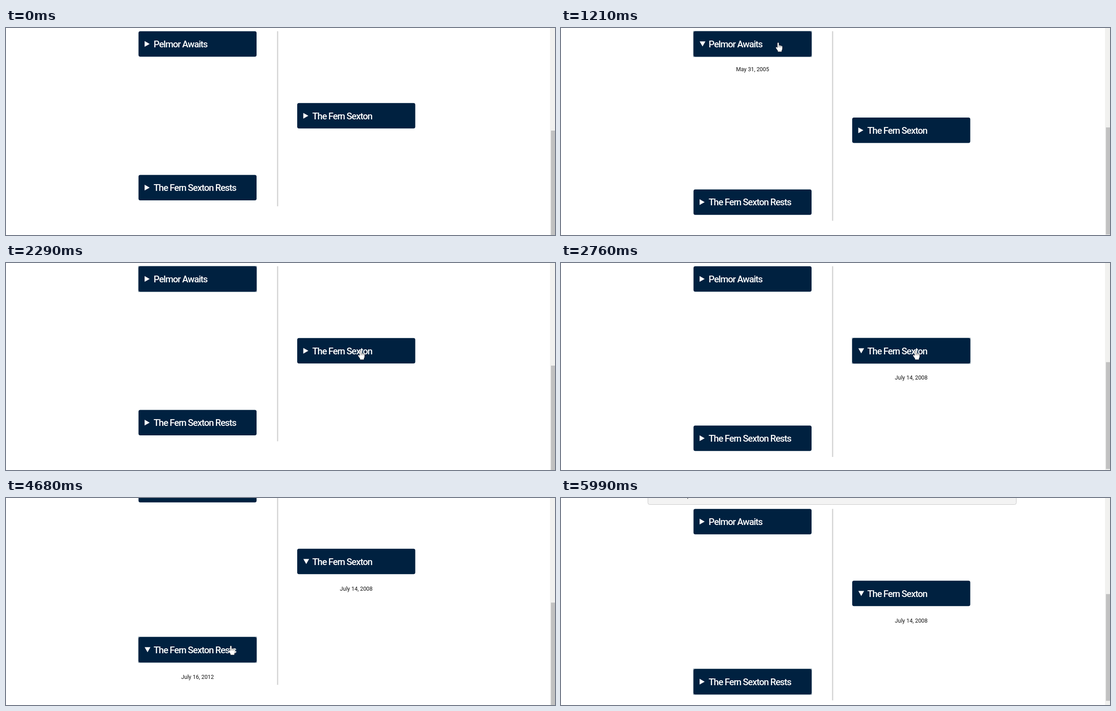
Recreate the animation shown at these times as an HTML page with a canvas. Size 1216 px wide and 460 px high, loop 6700 ms.

```html
<!DOCTYPE html>
<html lang="en">
<head>
<meta charset="utf-8">
<title>Timeline</title>
<style>
html, body { margin: 0; width: 100%; height: 100%; overflow: hidden; background: #fff; }
canvas { display: block; }
</style>
</head>
<body>
<canvas id="stage" width="1216" height="460"></canvas>
<script>
const ctx = document.getElementById('stage').getContext('2d');

// Time advances in discrete steps, like a screen recording.
const LOOP = 6700, START = 210, STEP = 77.1;
const HOLD = 2;
const BOX_W = 261.5, BOX_H = 56.5, TOP = 7.2, PITCH = 159.6;
const FULL_GAP = 36.5, SLIDE = 10.5;
const FONT = 'Roboto, "Open Sans", sans-serif';

const clicks = [
  { at: 9, item: 0 }, { at: 20, item: 0 }, { at: 28, item: 1 },
  { at: 42, item: 2 }, { at: 62, item: 2 }
];

const items = [
  ['Pelmor Awaits', 'May 31, 2005'],
  ['The Fern Sexton', 'July 14, 2008'],
  ['The Fern Sexton Rests', 'July 16, 2012']
].map(([title, date], i) => {
  const [open, shut = Infinity] = clicks.filter(c => c.item === i).map(c => c.at + HOLD);
  return { title, date, open, shut, x: i % 2 ? 645 : 293.5, y: TOP + PITCH * i };
});

const moves = [
  { from: 0, to: 8, x: 481, y: 32 },
  { from: 22, to: 27, x: 785, y: 194 },
  { from: 35, to: 42, x: 528, y: 374 },
  { from: 47, to: 52, x: 521, y: 250 },
  { from: 53, to: 58, x: 498, y: 328 },
  { from: 64, to: 67, x: 594, y: 318 },
  { from: 67, to: 70, x: 667, y: 301 },
  { from: 72, to: 74, x: 895, y: 369 }
];
const LAST_STEP = 74;

const clamp = v => Math.min(Math.max(v, 0), 1);
const sum = list => list.reduce((a, b) => a + b, 0);

function ease(n, from, to) {
  const p = clamp((n - from) / (to - from));
  return p * p * (3 - 2 * p);
}

function pointerAt(n) {
  let x = 1032, y = 446;
  for (const m of moves) {
    const p = ease(n, m.from, m.to);
    x += (m.x - x) * p;
    y += (m.y - y) * p;
  }
  return { x, y };
}

const isOpen = (it, n) => n >= it.open && n < it.shut;
const reveal = (it, n) => 1 - Math.pow(1 - clamp((n - it.open) / 4), 1.3);

function gapOf(it, n) {
  if (n < it.open) return 0;
  if (isOpen(it, n)) return FULL_GAP - SLIDE * (1 - reveal(it, n));
  return FULL_GAP * Math.pow(1 - clamp((n - it.shut + 1) / 5), 1.5);
}

function roundBox(x, y, w, h, r, color) {
  ctx.fillStyle = color;
  ctx.beginPath();
  ctx.roundRect(x, y, w, h, r);
  ctx.fill();
}

function label(text, x, y, font, color, align = 'left', spacing = 0) {
  ctx.font = font;
  ctx.fillStyle = color;
  ctx.textAlign = align;
  ctx.letterSpacing = spacing + 'px';
  ctx.fillText(text, x, y);
}

function triangle(x, y, turned) {
  ctx.save();
  ctx.translate(x, y);
  if (turned) ctx.rotate(Math.PI / 2);
  ctx.fillStyle = '#fff';
  ctx.beginPath();
  ctx.moveTo(-5.6, -6.4);
  ctx.lineTo(5.6, 0);
  ctx.lineTo(-5.6, 6.4);
  ctx.fill();
  ctx.restore();
}

function drawItem(it, y, n, focused) {
  const { x } = it, mid = y + BOX_H / 2, open = isOpen(it, n);
  if (focused) roundBox(x - 0.8, y - 0.8, BOX_W + 1.6, BOX_H + 1.6, 1, '#93a3ae');
  roundBox(x, y, BOX_W, BOX_H, 4, '#002140');
  triangle(x + (open ? 20 : 19.1), mid, open);
  label(it.title, x + 33.5, mid + 7.5, '500 20.5px ' + FONT, '#fff', 'left', -1.1);
  if (!open) return;
  const p = reveal(it, n);
  ctx.globalAlpha = clamp(p * 1.7);
  label(it.date, x + BOX_W / 2, y + BOX_H + 26.5 + SLIDE * p, '12.3px ' + FONT, '#111', 'center');
  ctx.globalAlpha = 1;
}

function drawPanel(scroll) {
  const bottom = -2.5 - scroll;
  if (bottom < 0) return;
  roundBox(192.5, bottom - 80, 816, 80, 4, '#f3f3f3');
  ctx.strokeStyle = '#c8c8c8';
  ctx.lineWidth = 1;
  ctx.stroke();
  label(',', 277, bottom - 14.5, '13px "Noto Sans Mono", monospace', '#333');
}

function drawScrollbar(scroll, gap) {
  ctx.fillStyle = '#f1f1ef';
  ctx.fillRect(1205, 0, 11, 460);
  ctx.fillStyle = '#c1c1c1';
  ctx.fillRect(1207, 228 - gap * 0.22 + scroll * 0.38, 9, 243 - gap * 0.16);
}

const arrow = new Path2D('M.5 .5V14.5L3.8 11.4L6 16.4L8.2 15.4L6 10.6H10.3Z');
const hand = new Path2D('M-1.4 1.4Q0 -.6 1.4 1.4V7Q2.8 5.9 4 7.2Q5.5 6.4 6.5 7.9Q8.8 7.3 9.1 9.8V14Q9 16.5 7.6 18V20.5H-.6V18.6L-4.4 13.2Q-5.7 10.7 -3.8 10.5Q-2.6 10.6 -1.4 12.3Z');
const creases = new Path2D('M1.4 7V11M4 7.4V11M6.5 8V11');

function drawPointer(n, ys) {
  if (n < 0 || n > LAST_STEP) return;
  const { x, y } = pointerAt(n);
  if (clicks.some(c => n >= c.at && n < c.at + HOLD)) {
    ctx.fillStyle = 'rgba(255, 235, 0, 0.5)';
    ctx.beginPath();
    ctx.arc(x + 0.7, y, 10.7, 0, Math.PI * 2);
    ctx.fill();
  }
  const over = items.some((it, i) =>
    x >= it.x && x <= it.x + BOX_W && y >= ys[i] && y <= ys[i] + BOX_H);
  const shape = over ? hand : arrow;
  ctx.save();
  ctx.translate(x, y);
  ctx.fillStyle = '#fff';
  ctx.strokeStyle = '#111';
  ctx.lineWidth = 1;
  ctx.fill(shape);
  ctx.stroke(shape);
  if (over) {
    ctx.fill(shape);
    ctx.lineWidth = 0.6;
    ctx.stroke(creases);
  }
  ctx.restore();
}

function draw(time) {
  const n = Math.floor((time % LOOP - START + 6) / STEP);
  const gaps = items.map(it => gapOf(it, n));
  const total = sum(gaps);
  // The page cannot scroll past its end, so closing a box pulls it back.
  const scroll = Math.min(54 * ease(n, 46, 51) - 71 * ease(n, 66, 70), total);
  const ys = items.map((it, i) => it.y - scroll + sum(gaps.slice(0, i)));
  const focus = clicks.filter(c => c.at <= n).pop();

  ctx.fillStyle = '#fff';
  ctx.fillRect(0, 0, 1216, 460);
  drawPanel(scroll);
  ctx.fillStyle = '#d5d5d5';
  ctx.fillRect(600.3, TOP - scroll, 2.7, 389 + total);
  items.forEach((it, i) => drawItem(it, ys[i], n, focus && focus.item === i));
  drawScrollbar(scroll, total);
  drawPointer(n, ys);
}

const began = performance.now();
function tick() {
  draw(performance.now() - began);
  requestAnimationFrame(tick);
}
tick();
</script>
</body>
</html>
```
